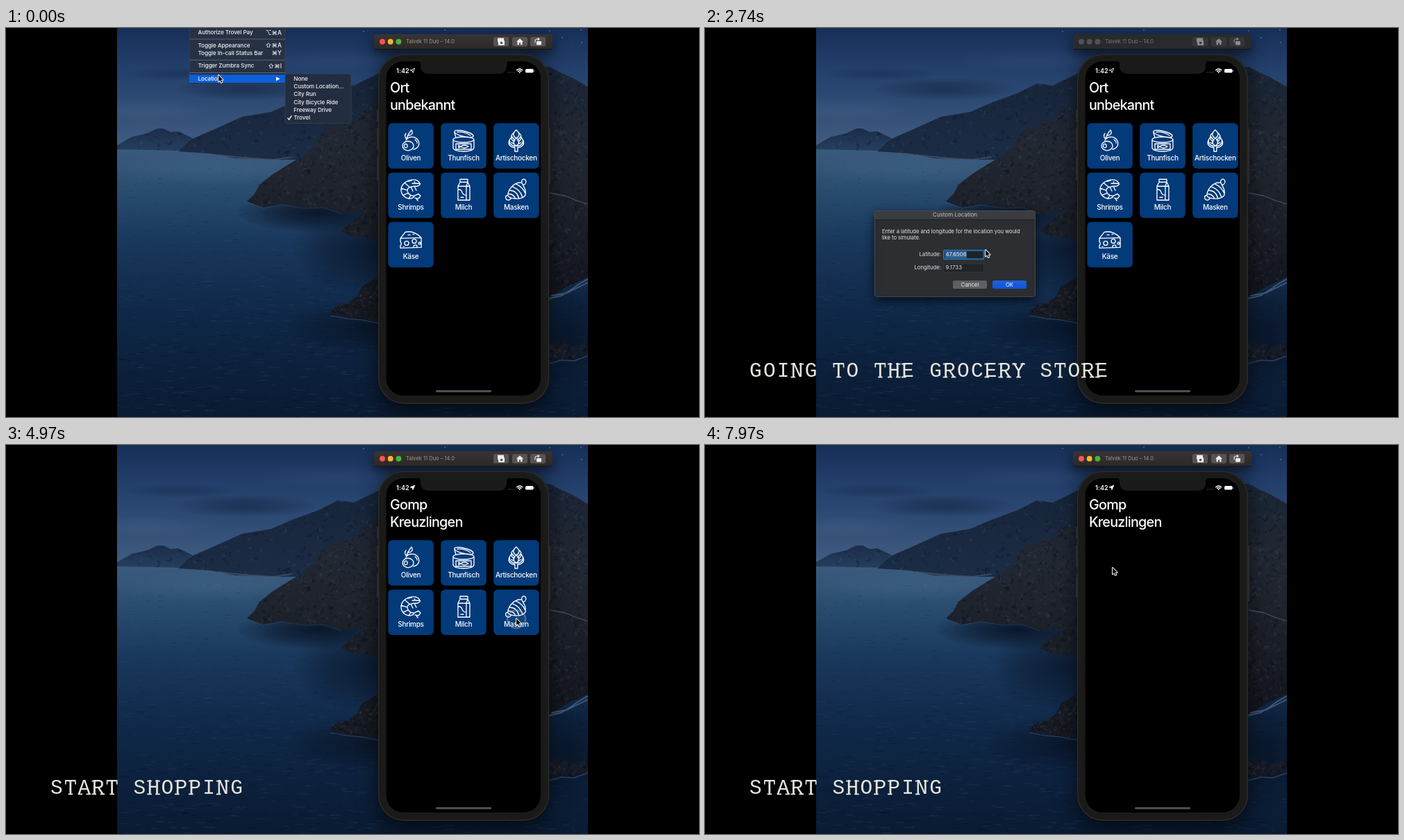
Recreate the animation shown at these times as an HTML page with a canvas. Size 998x561 px, loop 8000 ms.

```html
<!DOCTYPE html>
<html lang="en">
<head>
<meta charset="utf-8">
<title>Shopping list</title>
<style>
html, body { margin: 0; width: 100%; height: 100%; overflow: hidden; background: #000; }
canvas { display: block; width: 998px; height: 561px; }
</style>
</head>
<body>
<canvas id="stage" width="998" height="561"></canvas>
<script>
const W = 998, H = 561, LOOP = 8000;
const SANS = "Inter, 'DejaVu Sans', sans-serif";
const MONO = "'Liberation Mono', monospace";
const view = document.getElementById('stage').getContext('2d');
let g = view;

const clamp = v => Math.max(0, Math.min(1, v));
const ramp = (t, from, to) => clamp((t - from) / (to - from));
const ease = v => v * v * (3 - 2 * v);

function seeded(seed) {
  return () => (seed = (seed * 16807) % 2147483647) / 2147483647;
}
function text(s, x, y, size, color, { align = 'left', weight = 400, gap = 0, font = SANS } = {}) {
  g.font = `${weight} ${size}px ${font}`;
  g.letterSpacing = gap + 'px';
  g.textAlign = align;
  g.textBaseline = 'middle';
  g.fillStyle = color;
  g.fillText(s, x, y);
}
function rect(x, y, w, h, color) {
  g.fillStyle = color;
  g.fillRect(x, y, w, h);
}
function box(x, y, w, h, r, fill, line, width = 1) {
  g.beginPath();
  g.roundRect(x, y, w, h, r);
  if (fill) { g.fillStyle = fill; g.fill(); }
  if (line) { g.strokeStyle = line; g.lineWidth = width; g.stroke(); }
}
function shadowed(blur, dy, paint) {
  g.save();
  g.shadowColor = 'rgba(0,0,0,.65)';
  g.shadowBlur = blur;
  g.shadowOffsetY = dy;
  paint();
  g.restore();
}
function dot(x, y, r, color) {
  g.beginPath();
  g.arc(x, y, r, 0, 7);
  g.fillStyle = color;
  g.fill();
}
function glyph(d, x, y, fill, line, width = 1) {
  const p = new Path2D(d);
  g.save();
  g.translate(x, y);
  g.lineJoin = g.lineCap = 'round';
  if (line) { g.strokeStyle = line; g.lineWidth = width; g.stroke(p); }
  if (fill) { g.fillStyle = fill; g.fill(p); }
  g.restore();
}
function vertical(y0, y1, ...stops) {
  const grad = g.createLinearGradient(0, y0, 0, y1);
  stops.forEach((c, i) => grad.addColorStop(i / (stops.length - 1), c));
  return grad;
}

/* Landscape */
function rock(d, fill, seed, count, [x0, y0, x1, y1]) {
  const rnd = seeded(seed), p = new Path2D(d);
  g.save();
  g.fillStyle = fill;
  g.fill(p);
  g.clip(p);
  for (let i = 0; i < count; i++) {
    const x = x0 + rnd() * (x1 - x0), y = y0 + rnd() * (y1 - y0);
    const near = () => (rnd() - .5) * 13;
    g.fillStyle = rnd() < .4 ? 'rgba(100,110,125,.13)' : 'rgba(4,8,16,.22)';
    g.beginPath();
    g.moveTo(x, y);
    g.lineTo(x + near(), y + near());
    g.lineTo(x + near(), y + near());
    g.fill();
  }
  g.restore();
}
function haze(x, y, rx, ry, rgb, alpha) {
  g.save();
  g.translate(x, y);
  g.scale(1, ry / rx);
  const grad = g.createRadialGradient(0, 0, 0, 0, 0, rx);
  grad.addColorStop(0, `rgba(${rgb},${alpha})`);
  grad.addColorStop(.5, `rgba(${rgb},${alpha * .6})`);
  grad.addColorStop(1, `rgba(${rgb},0)`);
  g.fillStyle = grad;
  g.fillRect(-rx, -rx, 2 * rx, 2 * rx);
  g.restore();
}
function landscape() {
  const rnd = seeded(77);
  g.save();
  g.beginPath();
  g.rect(160, 0, 678, H);
  g.clip();
  rect(160, 0, 678, 180, vertical(0, 175, '#172f57', '#23406c', '#304d76', '#435e82'));
  haze(345, 88, 105, 17, '24,41,72', .7);
  haze(250, 66, 90, 10, '24,43,76', .5);
  haze(470, 46, 110, 16, '55,82,120', .3);
  haze(200, 118, 100, 17, '84,108,143', .25);
  for (const [x, y] of [[783, 4], [801, 14], [828, 3], [829, 21], [632, 3], [515, 5]]) dot(x, y, .7, '#8ea8cc');

  rect(160, 172, 678, 389, vertical(172, 561, '#3b5b7e', '#284b6e', '#1a395e', '#132e50', '#0e2645', '#0c203b', '#0a1a32'));
  haze(310, 202, 170, 24, '76,111,146', .3);
  for (let i = 0; i < 1900; i++) {
    const depth = rnd(), y = 176 + depth * 385, x = 160 + rnd() * 678;
    rect(x, y, 2 + rnd() * (4 + depth * 12), .5 + depth * .8,
      rnd() < .5 ? 'rgba(96,130,165,.11)' : 'rgba(3,10,25,.17)');
  }
  haze(450, 266, 120, 30, '9,20,38', .95);
  haze(520, 320, 110, 65, '9,20,38', .75);
  haze(520, 432, 120, 40, '8,17,33', .7);
  haze(810, 440, 70, 90, '8,17,33', .7);

  rock('M160 169L181 157L203 152L218 145L227 145L237 150L248 149L265 157L300 178L160 175Z',
    vertical(144, 178, '#1b2c49', '#26405f'), 5, 40, [160, 144, 300, 178]);
  rock('M248 178L268 160L300 146L340 128L382 121L412 108L450 94L478 80L501 83L540 64L540 190L385 190L330 188L295 181Z',
    vertical(64, 190, '#172439', '#1b2c45'), 19, 420, [248, 64, 540, 190]);
  glyph('M305 183L340 187L385 190L412 186', 0, 0, null, 'rgba(85,91,112,.6)', 1.8);
  rock('M347 250L358 239L365 226L384 211L408 196L428 184L442 174L449 157L466 143L500 134L517 119L540 101L700 55L783 56L800 65L816 72L838 85L838 360L810 372L783 388L540 263L510 265L484 268L456 258L428 259L397 254L370 259Z',
    vertical(60, 370, '#1a2535', '#222833', '#1c2029', '#14171f'), 31, 4200, [345, 55, 838, 388]);
  glyph('M347 251L370 260L397 255L430 260L457 259L483 268', 0, 0, null, 'rgba(96,121,151,.28)', .8);
  glyph('M783 238L805 242L822 249L838 254', 0, 0, null, 'rgba(111,117,126,.55)', 1.3);
  rock('M482 293L492 283L505 273L520 264L540 255L540 309L519 302L498 300Z', '#1b1f28', 43, 170, [480, 255, 540, 309]);
  rock('M466 413L476 401L491 397L506 387L512 373L525 366L540 356L540 425L518 420L498 418L481 415Z',
    '#171a22', 53, 330, [466, 356, 540, 425]);
  glyph('M468 415L490 419L512 421L538 426', 0, 0, null, 'rgba(128,148,173,.35)', 1);
  glyph('M783 390L800 386L816 376L824 370L838 362M786 386L808 382L838 367', 0, 0, null, 'rgba(128,151,181,.45)', 1.8);
  rock('M780 456L797 452L814 459L838 455L838 472L815 477L780 481Z', '#151b28', 61, 100, [780, 450, 838, 482]);
  glyph('M782 484L800 479L818 480L838 473', 0, 0, null, 'rgba(111,136,168,.35)', 1.5);
  g.restore();
}

/* Simulator window */
function device() {
  g.save();
  g.beginPath();
  g.rect(160, 0, 678, H);
  g.clip();
  shadowed(30, 9, () => box(536, 37.5, 246, 504.5, 37, '#1a1a19'));
  shadowed(20, 6, () => box(530, 9, 257, 22, 4, '#2b2827'));
  g.restore();
  for (const [x, y, h] of [[534, 118, 17], [534, 145, 31], [534, 186, 34], [782, 145, 80]]) rect(x, y, 2, h, '#292a2b');
  box(536.7, 38.2, 244.6, 503, 36.5, '#1a1a19', '#2c2c2b', 1.4);
  box(547.5, 48, 222.5, 482, 25, '#000');
  glyph('M593 47.5Q597 48 597 52V54Q597 66 609 66H709Q721 66 721 54V52Q721 48 725 47.5Z', 0, 0, '#1a1a19');
  box(619, 522.3, 80, 3, 1.5, '#53525b');
}
function titleBar(active) {
  box(530, 9, 257, 22, 4, active ? vertical(9, 31, '#383433', '#2b2827') : '#282a2e');
  rect(531, 30, 255, 1, 'rgba(0,0,0,.5)');
  const lights = active ? ['#f9564e', '#f4b62b', '#42b83b'] : ['#505257', '#505257', '#505257'];
  lights.forEach((c, i) => dot(542 + i * 11.7, 19.8, 4, c));
  text('Talvek 11 Duo – 14.0', 576, 20, 7.5, active ? '#9b9897' : '#75787d');
  const ink = active ? '#eeeeee' : '#8a8c90', face = active ? '#565351' : '#34363a';
  for (const x of [702, 729, 755]) box(x, 13, 22, 13.5, 2.5, face);
  rect(708, 14.5, 9, 6, ink);
  box(709, 18, 9, 7, 1, ink);
  dot(713.5, 21.5, 1.8, face);
  glyph('M-5 0L0 -4.5L5 0L3.5 0V4.5H1V1.5H-1V4.5H-3.5V0Z', 740, 19.8, ink);
  box(764, 19, 7, 5.5, 1, ink);
  glyph('M-4 1V-1Q-4 -4 -1 -4H1M0 -5.5L2 -4L0 -2.5', 766, 20, null, ink, 1.1);
}
function statusBar(located) {
  text('1:42', 562, 62, 9, '#fff', { weight: 600, gap: .1 });
  glyph('M3 -3L.5 3L-.2 .2L-3 -.5Z', 585.5, 61.5, located ? '#fff' : null, '#fff', .9);
  for (let i = 0; i < 4; i++) dot(723.5 + i * 2.7, 64, .7, '#55555a');
  glyph('M-4 -1Q0 -4.5 4 -1M-2.2 .8Q0 -1.1 2.2 .8', 739.7, 61.7, null, '#fff', 1.5);
  dot(739.7, 64, 1, '#fff');
  box(748, 59, 11.5, 5.6, 1.7, '#fff');
  rect(760.2, 60.6, .9, 2.4, '#999');
}

/* Product tiles, icons are centred on 0,0 */
const CLICKS = [7600, 7000, 6550, 6000, 5500, 4930, 4450];
const TILES = [
  ['Oliven', 'M-7 0C-5 -5 4 -7 9 -2C14 4 12 11 4 13M-12 8A8 6.8 0 1 0 4 8A8 6.8 0 1 0 -12 8M-9.5 8A2.3 2.3 0 1 0 -5 8A2.3 2.3 0 1 0 -9.5 8M-6 -2C-5 -7 -3 -10 1 -15C4 -10 1 -7 -4 -7M-6 -2C-9 -4 -9 -8 -7 -10M6 -1Q9 1 9 4'],
  ['Thunfisch', 'M-15 -1A15 4 0 0 0 15 -1A15 4 0 0 0 -15 -1V11Q-13 16 0 16Q13 16 15 11V-1M-13 -12C-15 -18 14 -12 14 -6C14 -2 -10 -6 -13 -12M-9 -12Q1 -13 10 -7M-11 5H11V13H-11ZM-7 7L-4 9Q1 5 7 9Q1 13 -4 9L-7 11ZM-13 -11L-11 -4'],
  ['Artischocken', 'M0 -15C6 -10 5 -6 0 -3C-5 -6 -6 -10 0 -15M-3 -11C-9 -8 -8 -1 -3 2M3 -11C9 -8 8 -1 3 2M0 -3C5 0 5 5 0 8C-5 5 -5 0 0 -3M-6 -5C-12 -1 -10 6 -4 8L0 8M6 -5C12 -1 10 6 4 8L0 8M-10 0C-13 7 -6 11 -2 10V16H2V10C6 11 13 7 10 0M-6 -5L-2 0M6 -5L2 0M-7 3L-4 5M7 3L4 5'],
  ['Shrimps', 'M13 -9C10 -17 -3 -15 -9 -10C-17 -3 -15 8 -6 12C-1 14 4 12 5 9C1 9 -4 7 -5 2C-6 -4 3 -5 8 -5C13 -5 14 -9 13 -9L2 -9M-9 -10L-2 -4M-14 -2L-5 1M-11 8L-4 5M-3 13L0 8M5 9L11 6L14 9L11 13L6 12M8 13L10 16M0 -4L3 2M5 -5L8 1M5 -11H6M-4 -12L1 -13'],
  ['Milch', 'M-5 -15H6V-11L9 -5V15H-8V-5L-5 -11ZM-5 -11H6M-8 -5H4V15M4 -5L6 -11M4 -5H9M-8 0Q-3 -1 -2 4Q0 8 4 8M-4 11H0'],
  ['Masken', 'M-12 8C-12 0 -3 -12 8 -10C11 -4 15 1 13 8C10 13 0 14 -7 12C-10 11 -12 10 -12 8M8 -10C7 -16 13 -17 14 -12C14 -9 12 -7 10 -7M-12 8C-17 8 -16 15 -11 15C-9 15 -8 13 -7 12M-9 1Q1 1 4 13M-5 -4Q6 0 9 11M0 -8Q9 -4 13 5M-11 6Q-4 6 -1 13'],
  ['Käse', 'M-15 -1L-8 -10Q4 -13 15 -2V12L-15 13V9A3 3 0 0 0 -15 4ZM-15 -1L15 -2M-9 6A3 3 0 1 0 -3 6A3 3 0 1 0 -9 6M2 3A3 3 0 1 0 8 3A3 3 0 1 0 2 3M4 11A2.5 2.5 0 0 1 9 11M11 6A1.5 1.5 0 1 0 14 6A1.5 1.5 0 1 0 11 6M-4 -6H-1M3 -7H5M-11 11H-10']
];
function tiles(t) {
  TILES.forEach(([name, icon], i) => {
    const x = 550.3 + (i % 3) * 75.9, y = 137.3 + Math.floor(i / 3) * 71.2;
    g.globalAlpha = 1 - ramp(t, CLICKS[i] + 130, CLICKS[i] + 260);
    if (g.globalAlpha > 0) {
      box(x, y, 65.5, 65.5, 6, '#033a7a');
      glyph(icon, x + 32.7, y + 24.7, null, '#fff', 1.35);
      text(name, x + 32.7, y + 50.6, 10, '#fff', { align: 'center', weight: 450, gap: -.3 });
    }
    g.globalAlpha = 1;
  });
}

/* Menu and dialog */
const BLUE = '#0b5fdb', MENU = '#263143';
const ITEMS = [
  ['Authorize Trovel Pay', 7, '⌥⌘A'],
  ['Toggle Appearance', 25.2, '⇧⌘A'],
  ['Toggle In-call Status Bar', 36.6, '⌘Y'],
  ['Trigger Zumbra Sync', 55, '⇧⌘I']
];
const PLACES = ['None', 'Custom Location...', 'City Run', 'City Bicycle Ride', 'Freeway Drive', 'Trovel'];
function menu(x, y) {
  const style = { weight: 500, gap: -.09 };
  box(264, -8, 138, 89, 3, MENU, '#3e4959', .6);
  for (const line of [15.5, 45.8, 64]) rect(264, line, 138, 1, '#5a6475');
  for (const [name, mid, keys] of ITEMS) {
    text(name, 276.5, mid, 8.2, '#f1f3f6', style);
    text(keys, 397, mid, 8.5, '#f1f3f6', { align: 'right', weight: 500 });
  }
  rect(264, 67.3, 138, 11.8, BLUE);
  text('Location', 276.5, 73.2, 8.2, '#fff', style);
  glyph('M-2.5 -3L3 0L-2.5 3Z', 391.5, 73.2, '#fff');
  box(402, 66, 95, 71.5, 3, '#222d3f', '#3e4959', .6);
  const hover = x > 402 ? Math.floor((y - 67.6) / 11.3) : -1;
  PLACES.forEach((name, i) => {
    const mid = 73.2 + i * 11.3;
    if (i === hover) rect(402, mid - 5.7, 95, 11.4, BLUE);
    text(name, 414.3, mid, 8.2, '#f1f3f6', style);
  });
  glyph('M-2.5 .2L-.7 2.5L2.7 -2.8', 408.3, 129.7, null, '#fff', 1.3);
}
function dialog(pressed) {
  const ink = '#e4e4e5', small = { gap: -.05 };
  shadowed(14, 5, () => box(244.5, 263.5, 231, 124, 3, '#2c2e31', '#505358', .8));
  box(245, 264, 230, 12, [3, 3, 0, 0], '#3a3c3f');
  rect(245, 276, 230, .8, '#17181a');
  text('Custom Location', 360, 270, 8, '#c6c7c9', { align: 'center' });
  text('Enter a latitude and longitude for the location you would', 255, 293.3, 7.65, ink, small);
  text('like to simulate.', 255, 302.6, 7.65, ink, small);
  text('Latitude:', 340, 327, 7.7, ink, { align: 'right' });
  text('Longitude:', 340, 346, 7.7, ink, { align: 'right' });
  box(344, 320.8, 57.5, 12.4, 1, '#1f2226', '#216fb5', 2);
  rect(346, 322.4, 31, 9.4, '#3a6591');
  box(344, 340, 57.5, 12, 0, '#222427', '#3a3c3f', .7);
  text('47.6506', 346.5, 327, 7.7, ink, { gap: .1 });
  text('9.1733', 346.5, 346, 7.7, ink, { gap: .1 });
  box(357, 364.3, 49, 11.7, 2, '#5d5f62');
  box(414, 364.3, 49, 11.7, 2, pressed ? '#0d45b0' : vertical(364, 376, '#1c65e4', '#1452d2'));
  text('Cancel', 381.5, 370.2, 7.8, '#ececec', { align: 'center' });
  text('OK', 438.5, 370.2, 7.8, '#fff', { align: 'center' });
}

/* Pointer keys: time, x, y */
const MOVES = [
  [0, 306, 68], [250, 306, 69], [600, 408, 72], [900, 421, 80], [1300, 423, 81], [1700, 423, 82],
  [2400, 404, 320], [2850, 404, 320], [3200, 433, 365], [3850, 433, 365], [4380, 586, 312],
  [4550, 586, 312], [4880, 735, 250.5], [5080, 735, 250.5], [5430, 662, 244], [5620, 662, 244],
  [5930, 588, 242], [6120, 588, 242], [6480, 737, 182], [6660, 737, 182], [6950, 681.5, 186],
  [7160, 681.5, 186], [7530, 587, 177], [8000, 587, 177]
];
function pointer(t) {
  const i = MOVES.findIndex(k => k[0] > t);
  const a = MOVES[i - 1], b = MOVES[i], k = ease(ramp(t, a[0], b[0]));
  return [a[1] + (b[1] - a[1]) * k, a[2] + (b[2] - a[2]) * k];
}
function ring(t, x, y) {
  for (const c of CLICKS) {
    const a = ramp(t, c, c + 80) * (1 - ramp(t, c + 150, c + 300));
    if (!a) continue;
    g.globalAlpha = a;
    g.beginPath();
    g.arc(x, y + .7, 13, 0, 7);
    g.fillStyle = 'rgba(130,150,180,.2)';
    g.fill();
    g.strokeStyle = '#a4acb9';
    g.lineWidth = 2;
    g.stroke();
    g.globalAlpha = 1;
  }
}

/* Slab feet per letter: capitals sit on top; left, centre or right stem */
const FEET = { A: 'lr', E: 'Ll', H: 'LRlr', N: 'LRl', P: 'Ll', R: 'Llr', T: 'c', Y: 'LRc' };
const STEM = { l: 3, c: 9, r: 15 };
function caption(s, alpha) {
  if (!alpha) return;
  const x = 64, pitch = 19.93, color = '#e6e5dd';
  g.globalAlpha = alpha;
  text(s, x, 495.6, 29.5, color, { font: MONO, gap: pitch - 17.7 });
  [...s].forEach((ch, i) => {
    for (const foot of FEET[ch] || '') {
      const low = foot.toLowerCase();
      rect(x + i * pitch + STEM[low] - 3.3, foot === low ? 502.6 : 483.7, 6.6, 1.8, color);
    }
    if (ch === 'T') for (const arm of [1, 15.2]) rect(x + i * pitch + arm, 485, 1.7, 4.5, color);
  });
  g.globalAlpha = 1;
}

const layer = document.createElement('canvas');
layer.width = W;
layer.height = H;
g = layer.getContext('2d');
rect(0, 0, W, H, '#000');
landscape();
device();
g = view;

function draw(t) {
  const [x, y] = pointer(t);
  const asking = t >= 1600 && t < 3320, located = t >= 3420;
  g.drawImage(layer, 0, 0);
  titleBar(!asking);
  statusBar(located);
  const title = located ? ['Gomp', 'Kreuzlingen'] : ['Ort', 'unbekannt'];
  title.forEach((s, i) => text(s, 553, 87.2 + i * 24.4, 19.8, '#fff', { weight: 450, gap: -.78 }));
  tiles(t);
  if (t < 1400) menu(x, y);
  if (asking) dialog(t > 3230);
  caption('GOING TO THE GROCERY STORE', ramp(t, 300, 800) * (1 - ramp(t, 3000, 3480)));
  caption('START SHOPPING', ramp(t, 3520, 4020));
  ring(t, x, y);
  glyph('M0 0V9.3L2.2 7.3L3.7 10.8L5.2 10.1L3.7 6.8H6.6Z', x, y, '#0b0b0b', '#fff', 1.9);
}
function tick() {
  draw(performance.now() % LOOP);
  requestAnimationFrame(tick);
}
tick();
</script>
</body>
</html>
```
